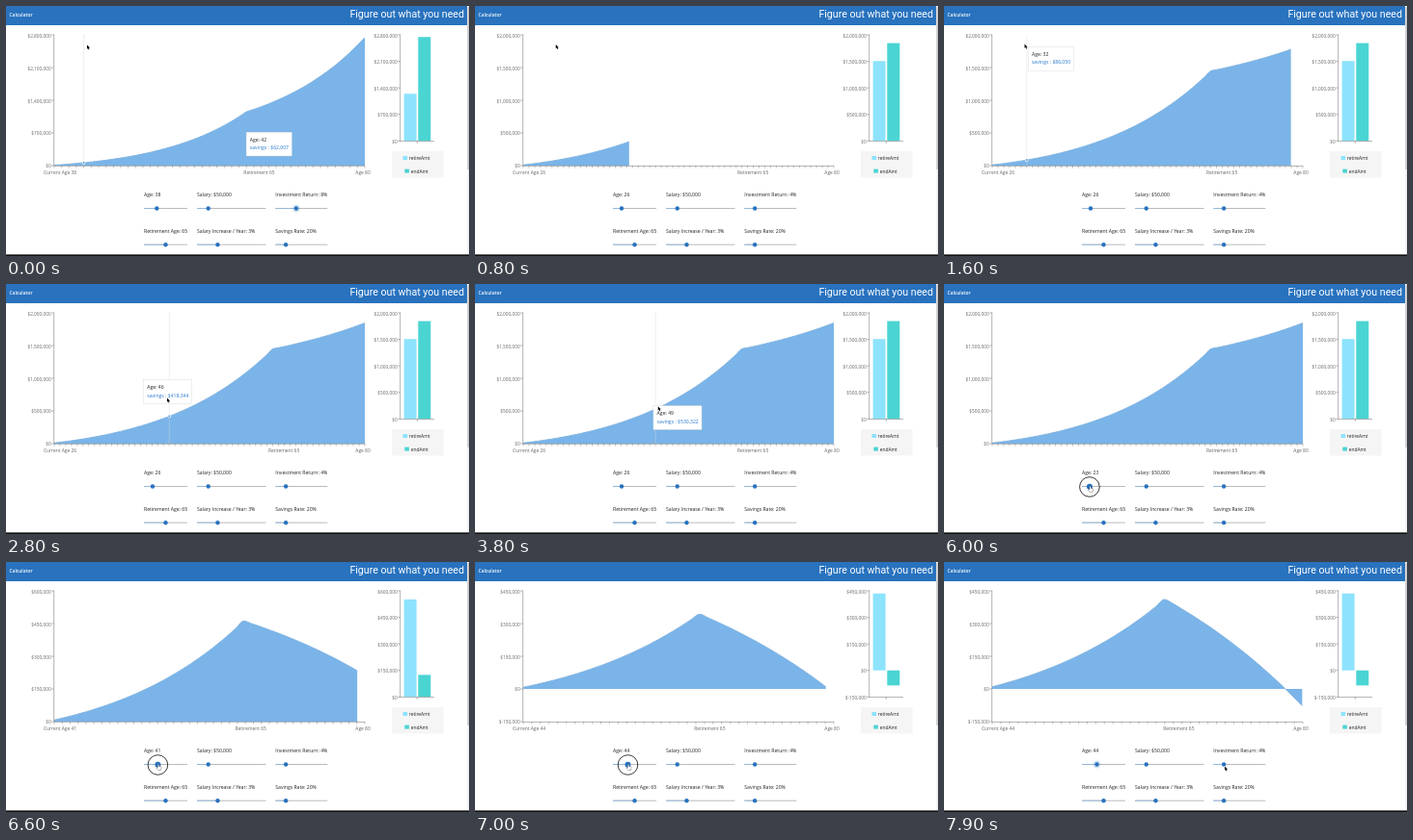
Recreate the animation shown at these times as an HTML page with a canvas. Size 480 px wide and 260 px high, loop 8 s.

```html
<!DOCTYPE html>
<html lang="en">
<head>
<meta charset="utf-8">
<title>Retirement calculator</title>
<style>
  html, body { margin: 0; width: 100%; height: 100%; overflow: hidden; background: #fff; }
  canvas { display: block; width: 480px; height: 260px; }
</style>
</head>
<body>
<canvas id="stage"></canvas>
<script>
const LOOP = 8000, TICK = 100;
const RELOAD = 400, HOVER = 1300, PRESS = 5800, RELEASE = 7200;
const LEFT = 50, WIDTH = 322, TOP = 30, BOTTOM = 166;
const BLUE = '#2872be', GREY = '#666', INK = '#222';
const SANS = '"Open Sans", "Noto Sans", sans-serif';
const ARROW = new Path2D('M0 0V4.3L1 3.5L1.7 5.1L2.5 4.8L1.8 3.2H3.1Z');
const HAND = new Path2D('M-.5 0H.5L.6 2L2.8 2.6L2.5 5.6H-.3L-1.8 3.4L-.5 3.2Z');
const canvas = document.getElementById('stage');
const ctx = canvas.getContext('2d');
const ratio = window.devicePixelRatio || 1;
canvas.width = 480 * ratio;
canvas.height = 260 * ratio;

const mix = (a, b, k) => a + (b - a) * k;
const clamp = (v, lo, hi) => Math.max(lo, Math.min(hi, v));
const money = v => '$' + Math.round(v).toLocaleString('en-US');

// cubic-bezier(.25, .1, .25, 1)
function ease(x) {
  if (x <= 0) return 0;
  if (x >= 1) return 1;
  let lo = 0, hi = 1;
  for (let i = 0; i < 24; i++) {
    const s = (lo + hi) / 2, r = 1 - s;
    if (.75 * s * r * r + .75 * s * s * r + s ** 3 < x) lo = s; else hi = s;
  }
  const r = 1 - lo;
  return .3 * lo * r * r + 3 * lo * lo * r + lo ** 3;
}

// Age on the slider: a short pull left, then a slowing pull right
function ageAt(t) {
  if (t < RELOAD) return 38;
  const back = clamp((t - PRESS) / 200, 0, 1);
  const forth = clamp((t - 6000) / 900, 0, 1);
  return Math.floor(26 - 3 * back + 21 * Math.sin(forth * Math.PI / 2));
}

// The charts pick up the dragged age a little late
function chartAge(t) {
  return t >= RELOAD && t < 6200 ? 26 : ageAt(t);
}

const rateAt = t => t < RELOAD ? .08 : .04;

// Time, x, y of the turning points of the pointer over the chart
const hoverPath = [[-370, 245.5, 128.5], [-150, 84, 40.5], [1700, 83.5, 39.5], [2430, 139, 97],
  [2800, 167, 118.5], [3900, 192, 128], [4300, 256, 132], [4700, 256.5, 132], [5700, 151, 209]];

function mouseAt(t) {
  if (t >= RELEASE) {
    const k = clamp((t - RELEASE) / 700, 0, 1);
    return [mix(158.5, 291, k), mix(209.5, 212.5, k) + 28 * Math.sin(Math.PI * k)];
  }
  const i = Math.max(1, hoverPath.findIndex(p => p[0] >= t));
  const end = t > 5700 ? hoverPath.length - 1 : i;
  const a = hoverPath[end - 1], b = hoverPath[end];
  const k = clamp((t - a[0]) / (b[0] - a[0]), 0, 1);
  return [mix(a[1], b[1], k), mix(a[2], b[2], k)];
}

function model(age, rate) {
  const values = [];
  let total = 0, saved = 10000;
  for (let a = age; a <= 80; a++) {
    total *= 1 + rate;
    total += a < 65 ? saved : -39800;
    saved *= 1.029967;
    values.push(total);
  }
  const bars = [values[64 - age] * (1 + rate), total];
  const max = Math.max(...values, ...bars), min = Math.min(0, ...values);
  let unit = 50000;
  while (Math.ceil(-min / unit) + Math.ceil(max / unit) > 4) unit += 50000;
  const below = Math.ceil(-min / unit);
  const yOf = (v, top, bottom) => bottom - (v / unit + below) * (bottom - top) / 4;
  const gap = WIDTH / (values.length - 1);
  const points = values.map((v, i) => [LEFT + i * gap, yOf(v, TOP, BOTTOM)]);
  return { age, values, bars, unit, below, yOf, gap, points, base: yOf(0, TOP, BOTTOM) };
}

function text(str, x, y, size, color, align = 'left', family = SANS, weight = '400') {
  ctx.font = `${weight} ${size}px ${family}`;
  ctx.fillStyle = color;
  ctx.textAlign = align;
  ctx.fillText(str, x, y);
}

function line(x1, y1, x2, y2, color = GREY, width = .5) {
  ctx.strokeStyle = color;
  ctx.lineWidth = width;
  ctx.beginPath();
  ctx.moveTo(x1, y1);
  ctx.lineTo(x2, y2);
  ctx.stroke();
}

function disc(x, y, r, color) {
  ctx.fillStyle = color;
  ctx.beginPath();
  ctx.arc(x, y, r, 0, 7);
  ctx.fill();
}

function rect(x, y, w, h, color) {
  ctx.fillStyle = color;
  ctx.fillRect(x, y, w, h);
}

// Monotone cubic through the points
function curve(p) {
  const n = p.length;
  const slope = i => (p[i + 1][1] - p[i][1]) / (p[i + 1][0] - p[i][0]);
  const tangent = p.map((_, i) => {
    const a = slope(Math.max(0, i - 1)), b = slope(Math.min(n - 2, i));
    if (a * b <= 0) return 0;
    return Math.sign(a) * 2 * Math.min(Math.abs(a), Math.abs(b), Math.abs(a + b) / 4);
  });
  for (let i = 0; i < n - 1; i++) {
    const [x, y] = p[i], [u, v] = p[i + 1], d = (u - x) / 3;
    ctx.bezierCurveTo(x + d, y + d * tangent[i], u - d, v - d * tangent[i + 1], u, v);
  }
}

function area(points, base, shown) {
  const first = points[0], last = points[points.length - 1];
  ctx.save();
  ctx.beginPath();
  ctx.rect(LEFT, 20, WIDTH * shown, 150);
  ctx.clip();
  ctx.beginPath();
  ctx.moveTo(...first);
  curve(points);
  ctx.strokeStyle = '#4486c4';
  ctx.lineWidth = .6;
  ctx.stroke();
  ctx.lineTo(last[0], base);
  ctx.lineTo(first[0], base);
  ctx.fillStyle = '#7ab4e8';
  ctx.fill();
  ctx.restore();
}

function yAxis(m, x, top, bottom) {
  line(x, top - .5, x, bottom + .5);
  for (let i = 0; i <= 4; i++) {
    const v = (i - m.below) * m.unit, y = m.yOf(v, top, bottom);
    line(x - 2.4, y, x, y);
    text(money(v), x - 3, y + 2.2 + i * .2, 4.8, GREY, 'right');
  }
}

function areaChart(t, m) {
  let points = m.points, base = m.base, shown = 1;
  if (t >= RELOAD) shown = ease((t - RELOAD - 70) / 1500);

  let start = t;
  while (start > RELOAD && chartAge(start - TICK) === m.age) start -= TICK;
  if (start > RELOAD) {
    const prev = model(chartAge(start - TICK), rateAt(t));
    const k = ease((t - start) / 1500), scale = prev.points.length / points.length;
    points = points.map((p, i) => {
      const q = prev.points[Math.floor(i * scale)];
      return [mix(q[0], p[0], k), mix(q[1], p[1], k)];
    });
    base = mix(prev.base, base, k);
  }
  area(points, base, shown);

  yAxis(m, LEFT - .3, TOP, BOTTOM);
  line(LEFT, BOTTOM + .4, LEFT + WIDTH, BOTTOM + .4);
  for (const [x] of m.points) line(x, BOTTOM, x, BOTTOM + 2.6, GREY, .4);
  const label = (str, x) => text(str, x, 175.3, 4.9, GREY, 'center');
  if (ageAt(t) === m.age) label('Current Age ' + m.age, 56);
  label('Retirement 65', LEFT + (65 - m.age) * m.gap + 5.5);
  label('Age 80', 370);
}

function barChart(t, m) {
  const top = 30, bottom = 140.3, zero = m.yOf(0, top, bottom);
  const grown = t < RELOAD ? 1 : ease((t - RELOAD) / 400);
  rect(400, 151, 53.6, 27.5, '#f5f5f5');
  ['retireAmt', 'endAmt'].forEach((name, i) => {
    const color = ['#8de3fc', '#4ad4d2'][i];
    rect(412.6 + i * 14.7, zero, 13, (m.yOf(m.bars[i], top, bottom) - zero) * grown, color);
    rect(411.5 + i * 1.8, 156 + i * 13.6, 4.6, 4, color);
    text(name, 417.8 + i * 1.9, 160 + i * 13.6, 4.9, INK);
  });
  yAxis(m, 408.7, top, bottom);
  line(408.5, bottom + .3, 444, bottom + .3);
  line(426.3, bottom, 426.3, bottom + 2.6);
}

function hover(t, m, mx) {
  const i = clamp(Math.round((mx - LEFT) / m.gap), 0, m.values.length - 1);
  const [x, y] = m.points[i];
  line(x, 29, x, BOTTOM, 'rgba(215,215,215,.8)');
  disc(x, y, 1.8, '#fff');
  disc(x, y, 1.1, '#5b9fdc');

  // The box trails the pointer
  const [lagX, lagY] = mouseAt(t - 370), left = lagX + 3.6, top = lagY + 2.7;
  const label = 'savings : ' + money(m.values[i]);
  ctx.font = `400 5.1px ${SANS}`;
  const w = ctx.measureText(label).width + 7;
  rect(left, top, w, 24.8, '#fff');
  ctx.strokeStyle = '#d5d5d5';
  ctx.lineWidth = .4;
  ctx.strokeRect(left, top, w, 24.8);
  text('Age: ' + (m.age + i), left + 3.7, top + 9.4, 5.1, INK);
  text(label, left + 3.7, top + 18, 5.1, '#2676cc');
}

function slider(label, column, row, share, focus) {
  const x = [143, 198, 279.3][column], w = [45, 71.5, 54][column];
  const y = 210.5 + row * 37.7, knob = x + w * share;
  text(label, x, y - 12.7, 5.1, INK);
  line(x, y, x + w, y, '#aaa', .8);
  line(x, y, knob, y, '#8db6de', .8);
  if (focus) disc(knob, y, 4, 'rgba(40,114,190,.18)');
  disc(knob, y, 2.2, BLUE);
  return knob;
}

function cursor(shape, x, y, fill, edge) {
  ctx.save();
  ctx.translate(x, y);
  ctx.strokeStyle = edge;
  ctx.lineWidth = .6;
  ctx.stroke(shape);
  ctx.fillStyle = fill;
  ctx.fill(shape);
  ctx.restore();
}

function header() {
  rect(0, 0, 478, 20, BLUE);
  text('Calculator', 3.5, 10.9, 4.9, '#fff', 'left', SANS, '600');
  text('Figure out what you need', 475, 12.3, 10.65, '#fff', 'right', 'Roboto, sans-serif');
  rect(478, 0, 2, 258, '#f4f4f4');
  rect(478.4, 1, 1.4, 169, '#c4c4c4');
}

function draw(t) {
  const age = ageAt(t), rate = rateAt(t), m = model(chartAge(t), rate);
  const dragging = t >= PRESS && t < RELEASE;

  ctx.setTransform(ratio, 0, 0, ratio, 0, 0);
  rect(0, 0, 480, 260, '#fff');
  header();
  areaChart(t, m);
  barChart(t, m);

  const knob = slider('Age: ' + age, 0, 0, (age - 1) / 125, t >= RELEASE);
  slider('Salary: $50,000', 1, 0, .164);
  slider(`Investment Return: ${rate * 100}%`, 2, 0, rate * 5, t < RELOAD);
  slider('Retirement Age: 65', 0, 1, .5);
  slider('Salary Increase / Year: 3%', 1, 1, .3);
  slider('Savings Rate: 20%', 2, 1, .2);
  rect(0, 258.4, 480, 1.6, '#111');

  if (dragging) {
    disc(knob, 210.8, 3, BLUE);
    ctx.beginPath();
    ctx.arc(knob, 211, 10.3, 0, 7);
    ctx.strokeStyle = INK;
    ctx.lineWidth = .9;
    ctx.stroke();
    cursor(HAND, knob + .6, 210.6, '#fff', '#111');
    return;
  }
  const [x, y] = mouseAt(t);
  if (y < BOTTOM && (t < RELOAD || t >= HOVER)) hover(t, m, x);
  cursor(ARROW, x, y, '#000', '#fff');
}

function frame(now) {
  draw(Math.floor((now % LOOP) / TICK) * TICK);
  requestAnimationFrame(frame);
}
requestAnimationFrame(frame);
</script>
</body>
</html>
```
